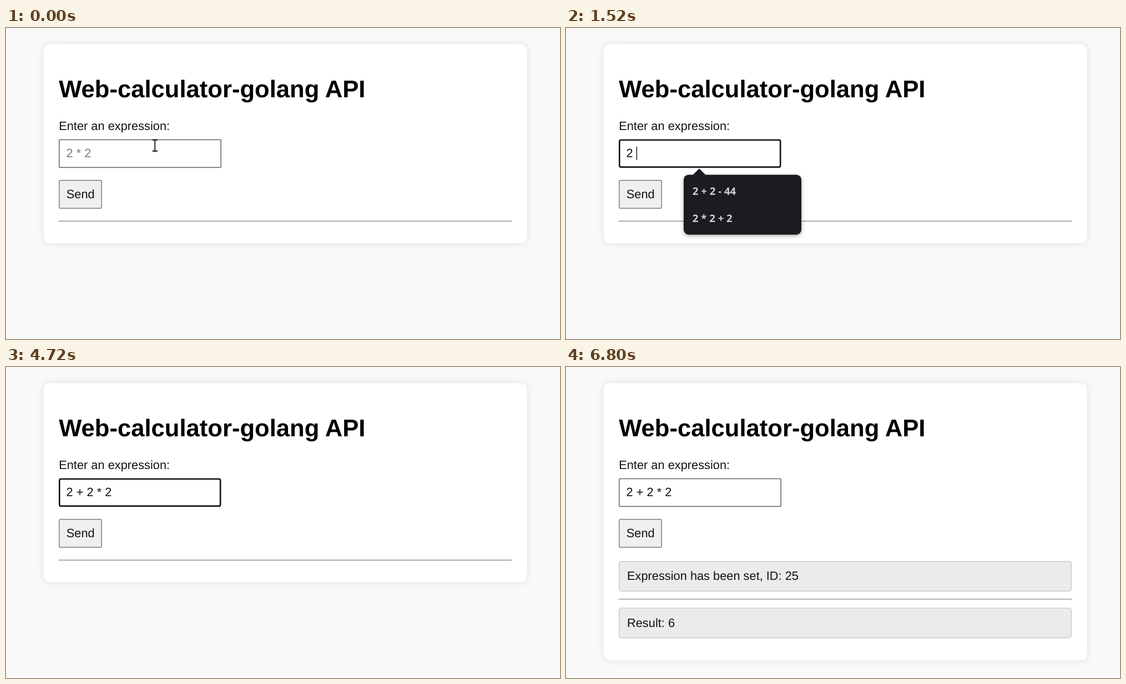
An HTML page with a canvas that plays this animation: 998 by 561 pixels, repeating every 8000 ms.

```html
<!DOCTYPE html>
<html lang="en">
<head>
<meta charset="utf-8">
<title>Web calculator</title>
<style>
  html, body { margin: 0; width: 100%; height: 100%; overflow: hidden; background: #f9f9f9; }
  canvas { display: block; width: 998px; height: 561px; }
</style>
</head>
<body>
<canvas id="stage" width="998" height="561"></canvas>
<script>
const ctx = document.getElementById('stage').getContext('2d');
const LOOP = 8000, STEP = 80;
const ARIAL = '"Liberation Sans", Arial, sans-serif';
const BODY = '21.8px ' + ARIAL;
const TITLE = 'bold 43.6px ' + ARIAL;
const MENU = 'bold 18.6px "Open Sans", "Noto Sans", sans-serif';

const FOCUS = 80, SENT = 5040, SOLVED = 6640;
const HISTORY = ['3 - 4', '5 - 4', '2 + 2 - 44', '2 * 2 + 2'];
const EXPRESSION = '2 + 2 * 2';
// One time for each typed character
const KEYS = [640, 1200, 1680, 1920, 2240, 2880, 3840, 4000, 4160];

// Kerns across spaces and places glyphs at fractions of a pixel
ctx.textRendering = 'geometricPrecision';

function box(x, y, w, h, r, fill, line, width = 1.4) {
  ctx.beginPath();
  ctx.roundRect(x, y, w, h, r);
  ctx.fillStyle = fill;
  ctx.fill();
  if (!line) return;
  const d = width / 2;
  ctx.beginPath();
  ctx.roundRect(x + d, y + d, w - width, h - width, Math.max(0, r - d));
  ctx.strokeStyle = line;
  ctx.lineWidth = width;
  ctx.stroke();
}

function text(str, x, y, font = BODY, color = '#111') {
  ctx.font = font;
  ctx.fillStyle = color;
  ctx.fillText(str, x, y);
}

function withShadow(color, blur, dy, draw) {
  ctx.save();
  ctx.shadowColor = color;
  ctx.shadowBlur = blur;
  ctx.shadowOffsetY = dy;
  draw();
  ctx.restore();
}

function rule(y) {
  ctx.fillStyle = '#9c9c9c';
  ctx.fillRect(95, y, 816, 1.4);
  ctx.fillStyle = '#d2d2d2';
  ctx.fillRect(95, y + 1.4, 816, 0.9);
}

function message(str, y) {
  box(95, y, 816, 55, 5, '#ebebeb', '#cbcbcb');
  text(str, 110, y + 34.4);
}

function menu(items) {
  if (!items.length) return;
  const h = 10.2 + 48.9 * items.length;
  withShadow('rgba(0,0,0,0.35)', 7, 2, () => box(212, 264.7, 212, h, 9, '#1c1b21'));
  ctx.beginPath();
  ctx.moveTo(227.5, 266);
  ctx.lineTo(240, 253.5);
  ctx.lineTo(252.5, 266);
  ctx.fillStyle = '#1c1b21';
  ctx.fill();
  items.forEach((item, i) => text(item, 227.8, 301.3 + 48.9 * i, MENU, '#d0d0d6'));
}

function pointer(x, y) {
  ctx.beginPath();
  for (const s of [-1, 1]) {
    ctx.moveTo(x - 4.5, y + 10 * s);
    ctx.lineTo(x + 4.5, y + 10 * s);
  }
  ctx.moveTo(x, y - 10);
  ctx.lineTo(x, y + 10);
  ctx.strokeStyle = '#111';
  ctx.lineWidth = 1.8;
  ctx.stroke();
}

function field(t, typed, focused) {
  if (focused) box(95, 200.7, 292.5, 51.5, 4, '#fff', '#101010', 2.6);
  else box(95, 200.7, 293, 51.5, 2.5, '#fff', '#626262', 1.5);
  if (typed) text(typed, 108.6, 233.4);
  else text('2 * 2', 108.6, 233.4, BODY, '#7b7b7b');
  if (!focused) return;
  const last = typed ? KEYS[typed.length - 1] : FOCUS;
  if ((t - last) % 1000 < 500) {
    ctx.font = BODY;
    ctx.fillStyle = '#111';
    ctx.fillRect(108.5 + ctx.measureText(typed).width, 214, 1.4, 24);
  }
}

function draw(t) {
  const typed = EXPRESSION.slice(0, KEYS.filter(k => t >= k).length);
  const focused = t >= FOCUS && t < SENT;
  const sent = t >= SENT;

  ctx.fillStyle = '#f9f9f9';
  ctx.fillRect(0, 0, 998, 561);
  withShadow('rgba(0,0,0,0.1)', 13.6, 0, () =>
    box(68, 29, 870.5, sent ? 500.5 : 359.3, 11, '#fff'));

  text('Web-calculator-golang API', 95.2, 124.8, TITLE, '#000');
  text('Enter an expression:', 95.2, 184.2);
  field(t, typed, focused);
  box(95, 274, 78, 52, 3.5, '#efefef', '#808080', 1.5);
  text('Send', 108.8, 306.8);

  if (sent) {
    message('Expression has been set, ID: 25', 350);
    rule(418);
    message(t < SOLVED ? 'Calculated...' : 'Result: 6', 434.2);
  } else {
    rule(347.5);
  }

  if (focused) menu(HISTORY.filter(item => item.startsWith(typed)));

  if (!typed) {
    const p = Math.min(1, Math.max(0, (t - FOCUS) / 160));
    pointer(268.3 - 110 * p, 212 + 40.5 * p * p);
  }
}

function tick(now) {
  const t = now % LOOP;
  draw(t - t % STEP);
  requestAnimationFrame(tick);
}
draw(0);
requestAnimationFrame(tick);
</script>
</body>
</html>
```
